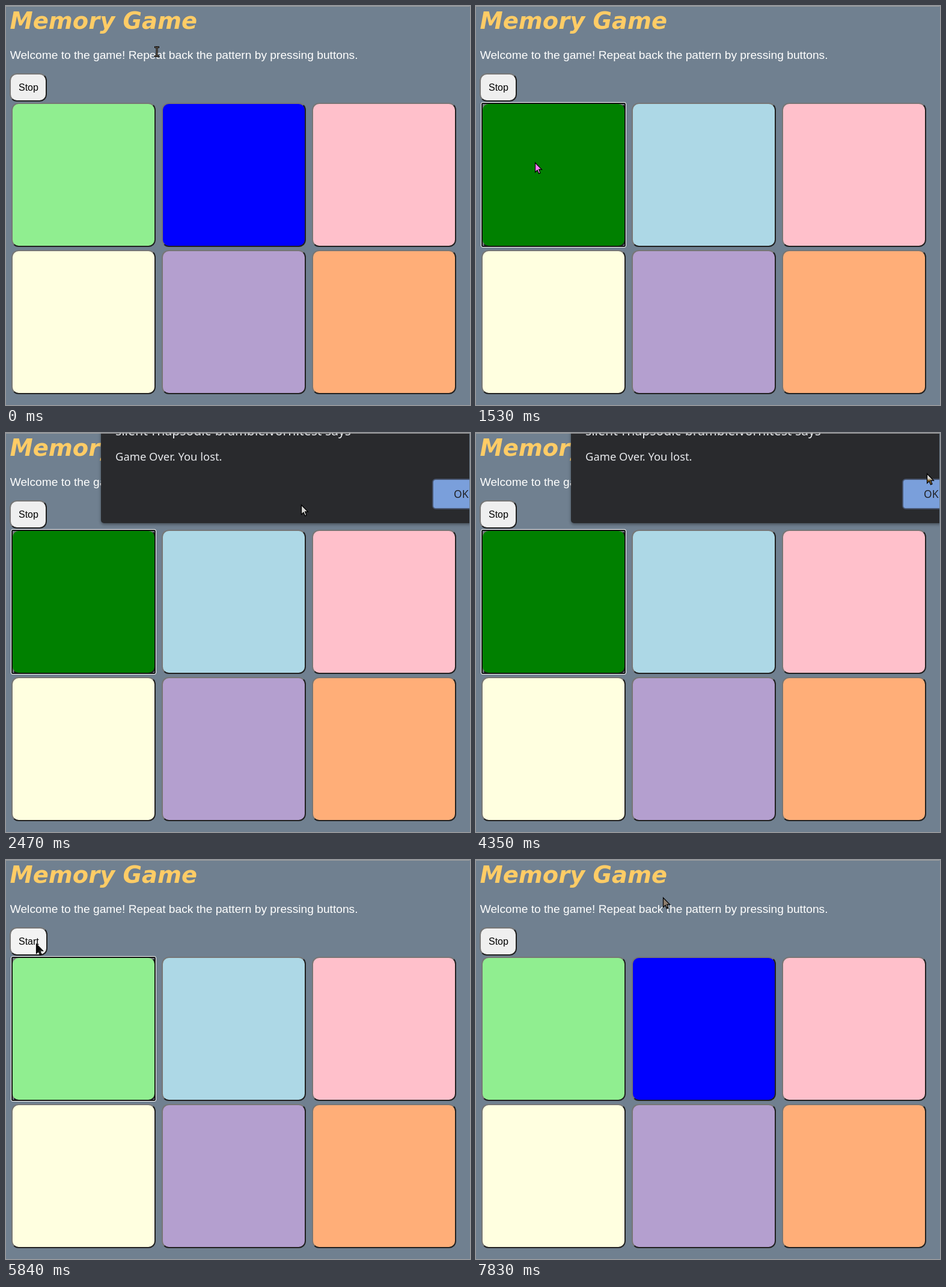
Recreate the animation shown at these times as an HTML page. Size 772 by 664 pixels, loop 8000 ms.

```html
<!DOCTYPE html>
<html lang="en">
<head>
<meta charset="utf-8">
<title>Memory Game</title>
<style>
  html, body { margin: 0; width: 100%; height: 100%; overflow: hidden; background: #708090; }
  #stage { position: relative; width: 772px; height: 664px; overflow: hidden; background: #708090; isolation: isolate; }
  #stage div, #stage svg { position: absolute; box-sizing: border-box; }
  .key { border: 2px solid; border-color: #767676 #212121 #212121 #767676; border-radius: 12px; }
  .pad { width: 240px; height: 240px; }
  #toggle { left: 6px; top: 112px; height: 47px; }
  #ring { left: 8px; top: 160px; width: 242px; height: 242px; border: 1px solid #fff; border-radius: 3px; box-shadow: inset 0 0 0 2px #101010; }
  .full { left: 0; top: 0; width: 772px; height: 664px; }
  #panel { left: 158px; top: -80px; width: 680px; height: 230px; background: #292a2d; border-radius: 5px; box-shadow: 0 2px 5px rgba(0, 0, 0, .4); }
  #ok { left: 709px; top: 76px; width: 110px; height: 51px; background: #7a9fdb; border: 2px solid #46536d; border-radius: 6px; }
  .title { font: italic bold 38.4px "DejaVu Sans", sans-serif; fill: #fc6; }
  .body { font: 19.2px "Liberation Sans", sans-serif; fill: #fff; }
  .label { font: 16px "Liberation Sans", sans-serif; fill: #000; }
  .alert { font-family: "Noto Sans", sans-serif; fill: #e8eaed; }
  .cursor { left: 0; top: 0; width: 14px; height: 21px; overflow: visible; }
  #invert { mix-blend-mode: difference; }
  #edge { border-top: 1px solid #a0a0a0; border-right: 1px solid #708090; }
</style>
</head>
<body>
<div id="stage">
  <div id="pads"></div>
  <div id="ring"></div>
  <div id="toggle" class="key"></div>
  <svg class="full">
    <text class="title" x="6.6" y="38">Memory Game</text>
    <text class="body" x="6.7" y="88">Welcome to the game! Repeat back the pattern by pressing buttons.</text>
    <text class="label" id="label" x="21" y="141"></text>
  </svg>
  <div id="dialog" class="full">
    <div id="panel"></div>
    <div id="ok"></div>
    <svg class="full" style="overflow:visible">
      <g class="alert">
        <text x="182" y="4" font-size="21.2">silent-rhapsodic-bramble.vorn.test says</text>
        <text x="182" y="46" font-size="18.4">Game Over. You lost.</text>
        <text x="745" y="108" font-size="17.5" font-weight="500" fill="#202124">OK</text>
      </g>
    </svg>
  </div>
  <svg class="cursor" id="invert"><path d="M1 2V15.5L4.2 12.4L7 18.3L8.4 17.7L6 11.5H10.5Z" fill="#fff"/></svg>
  <svg class="cursor" id="arrow"><path d="M.5 .8V16.5L4 13.2L6.5 18.9L9 17.9L6.8 12.2H11.5Z" fill="none" stroke="#000" stroke-width="1.2"/></svg>
  <svg class="cursor" id="beam">
    <path d="M0 1.5H8M0 16.5H8M4 1V17" stroke="#000" stroke-width="3" fill="none"/>
    <path d="M1 1.5H3.5M4.5 1.5H7M1 16.5H3.5M4.5 16.5H7M4 2V16" stroke="#8f7f6f" fill="none"/>
  </svg>
  <div id="edge" class="full"></div>
</div>
<script>
  const LOOP = 8000;
  // Moments of the game, in ms
  const UNLIT = 280, PRESS = 1530, ALERT = 1650, SETTLED = 1770, CLOSE = 4630, START = 6270, LIT = 7380;

  const $ = id => document.getElementById(id);
  const [pads, ring, toggle, label, dialog, invert, arrow, beam] =
    ['pads', 'ring', 'toggle', 'label', 'dialog', 'invert', 'arrow', 'beam'].map($);

  const colors = ['lightgreen', 'lightblue', 'pink', 'lightyellow', '#b49fcf', '#ffae78'];
  const keys = colors.map((color, i) => {
    const el = document.createElement('div');
    el.className = 'key pad';
    el.style.left = 9 + i % 3 * 250 + 'px';
    el.style.top = 161 + Math.floor(i / 3) * 245 + 'px';
    el.style.backgroundColor = color;
    pads.append(el);
    return el;
  });

  // The pointer glides to each stop in short ticks; bow lifts the middle of its way.
  const TICK = 140;
  const home = { x: 247, y: 67 };
  const glides = [
    { from: UNLIT, to: 580, x: 268, y: 103 },
    { from: 980, to: 1100, x: 98, y: 260 },
    { from: 1900, to: 2040, x: 505, y: 122 },
    { from: 2470, to: 3410, x: 173, y: 80, bow: 75 },
    { from: 3530, to: 4350, x: 750, y: 67 },
    { from: 4480, to: 4480, x: 748, y: 88 },
    { from: CLOSE, to: 5330, x: 11, y: 166 },
    { from: 5600, to: 5840, x: 50, y: 139 },
    { from: START, to: 6540, x: 257, y: 80 },
    { from: 6820, to: 6820, x: 257, y: 94 },
    { from: LIT, to: 7830, x: 311, y: 62 }
  ];

  const ease = u => u * u * (3 - 2 * u);
  const mix = (a, b, u) => a + (b - a) * u;

  function pointer(t) {
    let at = home;
    for (const { from, to, x, y, bow = 0 } of glides) {
      if (t < from) break;
      const gaps = Math.round((to - from) / TICK);
      const done = t >= to ? gaps : Math.floor((t - from) / (to - from) * gaps);
      const u = ease((done + 1) / (gaps + 1));
      at = { x: mix(at.x, x, u), y: mix(at.y, y, u) - bow * Math.sin(Math.PI * u) ** 2 };
    }
    return at;
  }

  const within = (t, a, b) => t >= a && t < b;
  const show = (el, on) => { el.style.visibility = on ? 'visible' : 'hidden'; };

  function draw(t) {
    const waiting = within(t, CLOSE, START);
    keys[0].style.backgroundColor = within(t, PRESS, CLOSE) ? 'green' : colors[0];
    keys[1].style.backgroundColor = within(t, UNLIT, LIT) ? colors[1] : 'blue';
    show(ring, within(t, PRESS, START));

    label.textContent = waiting ? 'Start' : 'Stop';
    toggle.style.width = waiting ? '63px' : '62px';
    toggle.style.backgroundColor = waiting ? '#f3f3f3' : '#efefef';

    show(dialog, within(t, ALERT, CLOSE));
    dialog.style.opacity = t < SETTLED ? .6 : 1;
    dialog.style.transform = t < SETTLED ? 'translateY(-15px)' : 'none';

    const { x, y } = pointer(t);
    const overText = t < 430 || within(t, 6540, 6820);
    for (const el of [invert, arrow, beam]) {
      el.style.left = Math.round(x) + 'px';
      el.style.top = Math.round(y) + 'px';
      show(el, (el === beam) === overText);
    }
  }

  const begin = performance.now();
  function tick() {
    draw((performance.now() - begin) % LOOP);
    requestAnimationFrame(tick);
  }
  tick();
</script>
</body>
</html>
```
